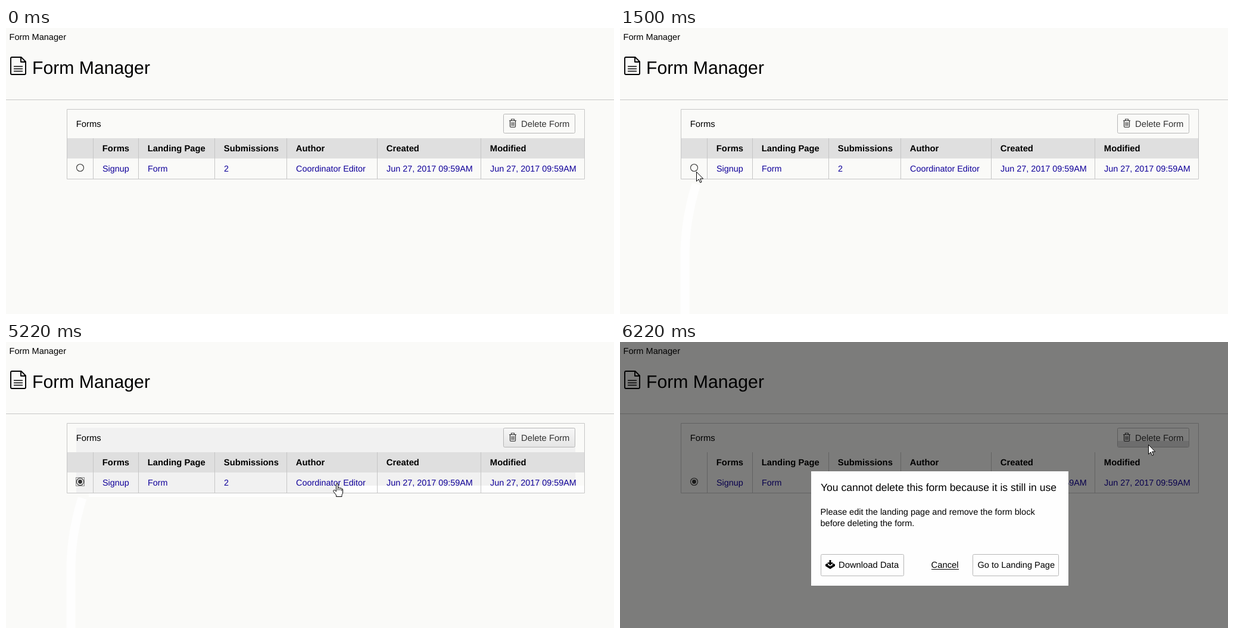
These frames come from a looping animation (1021 px wide and 480 px high, 8000 ms). An HTML page with a canvas:

```html
<!DOCTYPE html>
<html lang="en">
<head>
<meta charset="utf-8">
<title>Form Manager</title>
<style>
  html, body { margin: 0; width: 100%; height: 100%; overflow: hidden; background: #fafaf8; }
  canvas { display: block; }
</style>
</head>
<body>
<canvas width="1021" height="480"></canvas>
<script>
const ctx = document.querySelector('canvas').getContext('2d');
const LOOP = 8000, STEP = 90;
const PAPER = '#fafaf8', LINE = '#c6c6c6', LINK = '#10009a', INK = '#000';
const WHITE = '#fefefe', SHADE = '#f1f1f1', BUTTON_LINE = '#b6b6b6';
const PRESSED_RADIO = 2690, CHECKED = 2790, LEFT_RADIO = 5220, ON_BUTTON = 5860, PRESSED = 6130, MODAL = 6220;

const easeOut = k => 1 - (1 - k) ** 3;
const easeIn = k => k * k;

// The pointer moves in short legs and rests between them
const legs = [
  { start: 500, end: 1130, from: [102, 478], to: [118, 256], rise: easeOut },
  { start: 1320, end: 1500, from: [121, 252], to: [128, 241] },
  { start: 2330, end: 2420, from: [128, 239], to: [127, 236] },
  { start: LEFT_RADIO, end: 5580, from: [556, 237], to: [887, 185], rise: easeIn },
  { start: ON_BUTTON, end: 5950, from: [888, 178], to: [889, 172] },
  { start: MODAL, end: LOOP, from: [887, 172], to: [887, 172] }
];

const columns = [
  { left: 146, title: 'Forms', value: 'Signup' },
  { left: 222, title: 'Landing Page', value: 'Form' },
  { left: 350, title: 'Submissions', value: '2' },
  { left: 471, title: 'Author', value: 'Coordinator Editor' },
  { left: 623, title: 'Created', value: 'Jun 27, 2017 09:59AM' },
  { left: 797, title: 'Modified', value: 'Jun 27, 2017 09:59AM' }
];

const streak = new Path2D('M109 480V376Q110 320 128 262');
const arrow = new Path2D('M.5.5V16.3L4.2 12.8 6.7 18.5 9 17.5 6.6 12H11.7Z');
const hand = new Path2D('M-1.5 14V2Q-1.5.5 0 .5T1.5 2V8Q2 6.8 3.3 7.1T4.8 8.8Q5.4 7.7 6.6 8.2T7.7 9.7Q9.5 9 9.6 11V15Q9.6 17.5 8 19.5V22.5H-1.5V20L-5.8 14.4Q-7 12.5-5.6 11.7T-3 12.4Z');

function rect(x, y, w, h, fill) {
  ctx.fillStyle = fill;
  ctx.fillRect(x, y, w, h);
}

function box(x, y, w, h, radius, stroke, fill = 'transparent') {
  ctx.beginPath();
  ctx.roundRect(x + .5, y + .5, w - 1, h - 1, radius);
  ctx.fillStyle = fill;
  ctx.fill();
  ctx.strokeStyle = stroke;
  ctx.lineWidth = 1;
  ctx.stroke();
}

function text(str, x, y, size = 14.57, color = INK, weight = 'normal') {
  ctx.font = `${weight} ${size}px "Liberation Sans", Arial, sans-serif`;
  ctx.fillStyle = color;
  ctx.fillText(str, x, y);
}

function strokePath(path, width, color = INK) {
  ctx.strokeStyle = color;
  ctx.lineWidth = width;
  ctx.stroke(typeof path === 'string' ? new Path2D(path) : path);
}

function circle(x, y, r, color, filled) {
  ctx.beginPath();
  ctx.arc(x, y, r, 0, Math.PI * 2);
  ctx.fillStyle = ctx.strokeStyle = color;
  ctx.lineWidth = 1.1;
  filled ? ctx.fill() : ctx.stroke();
}

function pointerAt(t) {
  const leg = legs.findLast(({ start }) => start <= t);
  if (!leg) return null;
  const { start, end, from, to, rise = k => k } = leg;
  const k = Math.min(1, Math.floor((t - start) / STEP) * STEP / (end - start));
  return {
    x: from[0] + (to[0] - from[0]) * k,
    y: from[1] + (to[1] - from[1]) * rise(k)
  };
}

function isClickable({ x, y }) {
  const onButton = x > 835 && y > 144 && y < 177;
  const onLink = y > 228 && y < 244 && columns.some(({ left, value }) =>
    x >= left + 16 && x <= left + 16 + ctx.measureText(value).width);
  return onButton || onLink;
}

function drawHeading() {
  text('Form Manager', 5.5, 20);
  text('Form Manager', 44, 77, 30.2);
  ctx.lineJoin = 'round';
  strokePath('M10 49H25.5L33 56.5V76Q33 78 31 78H10Q8 78 8 76V51Q8 49 10 49ZM25 49V57H33', 1.9);
  strokePath('M13 64.5H28M13 68.5H28M13 72.5H28', 1.7);
  rect(0, 120, 1021, 1, LINE);
}

// Pale marks that the pointer leaves behind
function drawStreak(t, pointer) {
  const top = Math.max(260, pointer.y + 19);
  ctx.save();
  ctx.beginPath();
  ctx.rect(0, top, 1021, 480 - top);
  ctx.clip();
  strokePath(streak, 15, WHITE);
  ctx.restore();
}

function drawShading(t) {
  rect(118, 144, 838, 41, SHADE);
  rect(118, 219, 838, 22, SHADE);
  rect(118, 241, 853, 12, WHITE);
  if (t < LEFT_RADIO) return;
  const right = t < LEFT_RADIO + STEP ? 566 : 648;
  rect(118, 241, right - 118, 12, SHADE);
  rect(139, 254, right - 139, 6, WHITE);
}

function drawRadio(t) {
  const hot = t >= 2420 && t < LEFT_RADIO;
  const color = hot ? '#0078d7' : '#333';
  circle(124.5, 234.5, 6, color);
  if (t >= CHECKED) circle(124.5, 234.5, 3.4, color, true);
  if (t >= PRESSED_RADIO && t < PRESSED) {
    ctx.setLineDash([1, 1]);
    box(117, 227, 15, 15, 0, hot ? '#0b4f86' : '#222');
    ctx.setLineDash([]);
  }
}

function buttonFill(t) {
  if (t < CHECKED || t >= MODAL) return PAPER;
  const [top, bottom] = t >= PRESSED ? ['#e3e3e3', '#f6f6f6']
    : t >= ON_BUTTON ? ['#f5f5f5', '#dedede'] : ['#f7f7f7', '#e5e5e5'];
  const fill = ctx.createLinearGradient(0, 145, 0, 176);
  fill.addColorStop(0, top);
  fill.addColorStop(1, bottom);
  return fill;
}

function drawDeleteButton(t) {
  box(835, 144, 121, 33, 2, BUTTON_LINE, buttonFill(t));
  if (t >= MODAL) rect(836, 166, 119, 10, '#dcdcdc');
  strokePath('M845 155.5H857M848.5 155V153H853.5V155M846.5 156V165Q846.5 166.5 848 166.5H854Q855.5 166.5 855.5 165V156', 1.2, '#333');
  strokePath('M849 158V164.5M851 158V164.5M853 158V164.5', 1, '#333');
  text('Delete Form', 865, 166, 14.8, '#333');
}

function drawTable(t) {
  if (t < MODAL) rect(103, 185, 868, 34, '#dfdfdf');
  box(102, 136, 870, 118, 0, LINE);
  text('Forms', 117.7, 166, 14.8);
  for (const { left, title, value } of columns) {
    rect(left, 185, 1, 68, LINE);
    text(title, left + 15.8, 207, 14.8, INK, 'bold');
    text(value, left + 16, 241, 14.4, LINK);
  }
  drawRadio(t);
  drawDeleteButton(t);
}

function drawDialog() {
  rect(0, 0, 1021, 480, 'rgba(0,0,0,.5)');
  rect(321, 217, 432, 192, WHITE);
  text('You cannot delete this form because it is still in use', 337, 250, 17.55);
  text('Please edit the landing page and remove the form block', 336.5, 290);
  text('before deleting the form.', 336.5, 309);
  box(337, 356, 140, 37, 2, BUTTON_LINE);
  box(592, 356, 145, 37, 2, BUTTON_LINE);
  ctx.fillStyle = INK;
  ctx.fill(new Path2D('M351.5 366H354.5V370H358L353 375 348 370H351.5ZM345 373L348.5 371.5 350 373 348.5 374 353 376.5 357.5 374 356 373 357.5 371.5 361 373V376L353 381 345 376Z'));
  text('Download Data', 367, 379, 14.8);
  text('Cancel', 522.5, 379, 14.8);
  rect(523, 381, 46, 1, INK);
  text('Go to Landing Page', 600.5, 379);
}

function drawPointer(pointer, clickable) {
  const shape = clickable ? hand : arrow;
  ctx.save();
  ctx.translate(Math.round(pointer.x), Math.round(pointer.y));
  ctx.fillStyle = '#fff';
  ctx.fill(shape);
  strokePath(shape, 1);
  if (clickable) strokePath('M1.5 8V12M4.8 9V12M7.7 10V13', 1);
  ctx.restore();
}

function draw(t) {
  const pointer = pointerAt(t), modal = t >= MODAL;
  ctx.textRendering = 'geometricPrecision';
  rect(0, 0, 1021, 480, PAPER);
  if (pointer && !modal) drawStreak(t, pointer);
  if (t >= CHECKED && !modal) drawShading(t);
  drawHeading();
  drawTable(t);
  if (modal) drawDialog();
  if (pointer) drawPointer(pointer, !modal && isClickable(pointer));
}

const start = performance.now();
function tick() {
  draw((performance.now() - start) % LOOP);
  requestAnimationFrame(tick);
}
tick();
</script>
</body>
</html>
```
